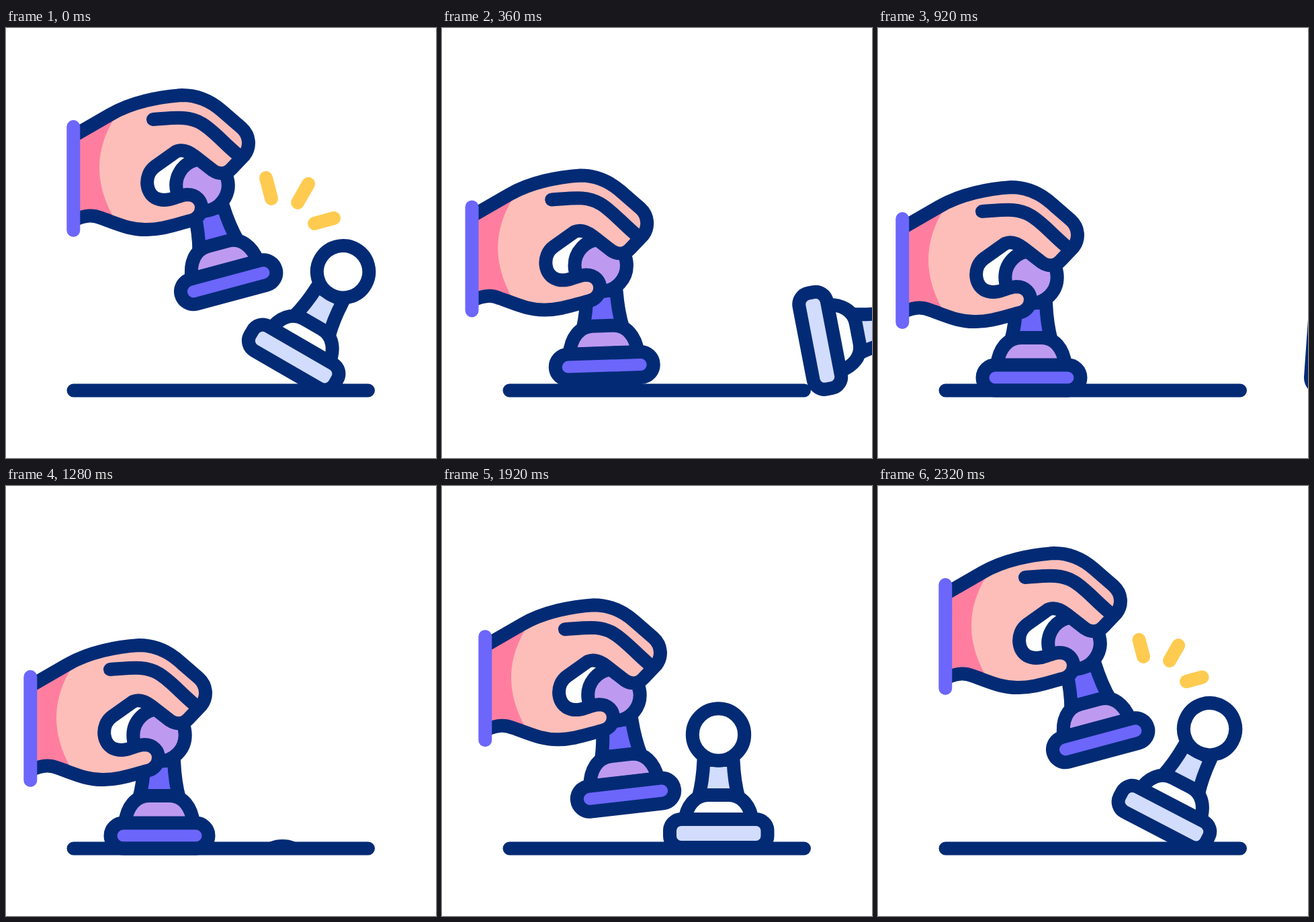
Recreate the animation shown at these times as an HTML page. Size 640x640 px, loop 2360 ms.

```html
<!DOCTYPE html>
<html lang="en">
<head>
<meta charset="utf-8">
<title>Pawn strike</title>
<style>
  html, body { margin: 0; width: 100%; height: 100%; overflow: hidden; background: #fff; }
  svg { display: block; width: 100vw; height: 100vh; }
  .ink { stroke: #032b75; stroke-width: 20; stroke-linecap: round; stroke-linejoin: round; }
  .none { fill: none; }
  .lilac { fill: #bd9af0; }
  .violet { fill: #6c66fb; }
  .white { fill: #fff; }
  .pale { fill: #d2dcfd; }
  .skin { fill: #fdbeb9; }
  .shade { fill: #ff7e9f; }
  .sleeve { stroke: #6c66fb; stroke-width: 20; stroke-linecap: round; }
  .ray { stroke: #fecb50; stroke-width: 20; stroke-linecap: round; }
</style>
</head>
<body>
<svg viewBox="0 0 640 640">
  <defs>
    <clipPath id="ground"><rect id="limit" width="640" height="640"/></clipPath>
    <path id="neck" d="M-22 38C-23 60 -25 76 -30 94H30C25 76 23 60 22 38Z"/>
    <path id="dome" d="M-51 131C-48 106 -35 90 -15 90H15C35 90 48 106 51 131Z"/>
    <circle id="head" r="38.7"/>
    <path id="palm" d="M103 159L155 129C187 110 230 102 262 100C287 100 306 110 321 123L351 149C363 160 364 177 355 189L336 209C328 218 317 218 308 212L281 191C271 183 262 180 253 184L222 206C204 219 207 250 228 255C245 259 254 249 270 248C284 248 291 258 291 267C291 277 284 285 274 287C250 293 232 300 210 300C185 301 165 291 142 283C130 278 120 278 103 285"/>
  </defs>

  <g clip-path="url(#ground)">
    <g id="victim" class="ink">
      <use href="#neck" class="pale"/>
      <use href="#head" class="white"/>
      <use href="#dome" class="white"/>
      <rect class="pale" x="-72.5" y="126" width="145.5" height="42" rx="17"/>
    </g>
  </g>

  <g id="hand">
    <g id="pawn" class="ink">
      <use href="#neck" class="violet"/>
      <use href="#head" class="lilac"/>
      <use href="#dome" class="lilac"/>
      <rect class="violet" x="-72.5" y="130.5" width="146" height="38" rx="19"/>
    </g>
    <use href="#palm" class="skin"/>
    <path class="shade" d="M103 159L162 133Q117 205 160 282L142 283C130 278 120 278 103 285Z"/>
    <use href="#palm" class="ink none"/>
    <path class="ink none" d="M219 136C250 134 271 130 291 142C307 151 322 169 343 187"/>
    <path class="sleeve" d="M100.3 147V301"/>
  </g>

  <path class="ink" d="M100.5 539.5H539"/>
  <g id="rays"></g>
</svg>
<script>
  const LOOP = 2360;
  const $ = id => document.getElementById(id);
  const clamp = v => Math.min(1, Math.max(0, v));
  const span = (t, from, length) => clamp((t - from) / length);
  const smooth = s => s * s * (3 - 2 * s);

  // cubic-bezier(a, 0, 0, 1)
  function ease(u, a) {
    let lo = 0, hi = 1;
    for (let i = 0; i < 24; i++) {
      const s = (lo + hi) / 2;
      if (3 * a * s * (1 - s) ** 2 + s ** 3 < u) lo = s; else hi = s;
    }
    return u >= 1 ? 1 : smooth(lo);
  }

  // inner x, y and outer x, y
  const rays = [[395, 254, 387, 223], [434, 260, 450, 232], [459, 291, 488, 283]].map(ends => {
    const line = document.createElementNS("http://www.w3.org/2000/svg", "line");
    line.setAttribute("class", "ray");
    $("rays").append(line);
    return { line, ends };
  });

  function drawRays(t) {
    const grow = t > 1200 ? span(t, 2150, 210) : 1;
    const trim = t > 1200 ? 0 : span(t, 0, 240);
    $("rays").style.display = grow > 0 && trim < 1 ? "" : "none";
    for (const { line, ends: [x, y, X, Y] } of rays) {
      const put = (n, k) => {
        line.setAttribute("x" + n, x + (X - x) * k);
        line.setAttribute("y" + n, y + (Y - y) * k);
      };
      put(1, trim);
      put(2, grow);
    }
  }

  function drawHand(t) {
    const down = ease(span(t, 0, 728), 0.25) - ease(span(t, 1800, 528), 0.33);
    $("hand").setAttribute("transform", `translate(${-64 * down} ${137 * down})`);
    $("pawn").setAttribute("transform", `translate(292 234) rotate(${-15 * (1 - down)})`);
  }

  function drawVictim(t) {
    let angle, slide, sink = 0;
    if (t < 1200) {
      const u = span(t, 0, 555);
      angle = 30 + 64 * smooth(u) + 39 * u * (1 - u) ** 2;
      slide = 7.8 + 202 * (1 - (1 - span(t, 0, 1165)) ** 1.77);
    } else {
      angle = 30 * span(t, 1940, 420) ** 0.9;
      slide = 0.26 * angle;
      sink = 227 * (1 - ease(span(t, 1200, 614), 0.33));
    }
    $("limit").setAttribute("height", t >= 1200 && t < 1940 ? 540 : 640);
    $("victim").setAttribute("transform",
      `translate(${466 + slide} ${519 + sink}) rotate(${angle}) translate(-54.5 -149)`);
  }

  const start = performance.now();
  function draw(now) {
    const t = Math.max(0, now - start) % LOOP;
    drawHand(t);
    drawVictim(t);
    drawRays(t);
    requestAnimationFrame(draw);
  }
  draw(start);
</script>
</body>
</html>
```
